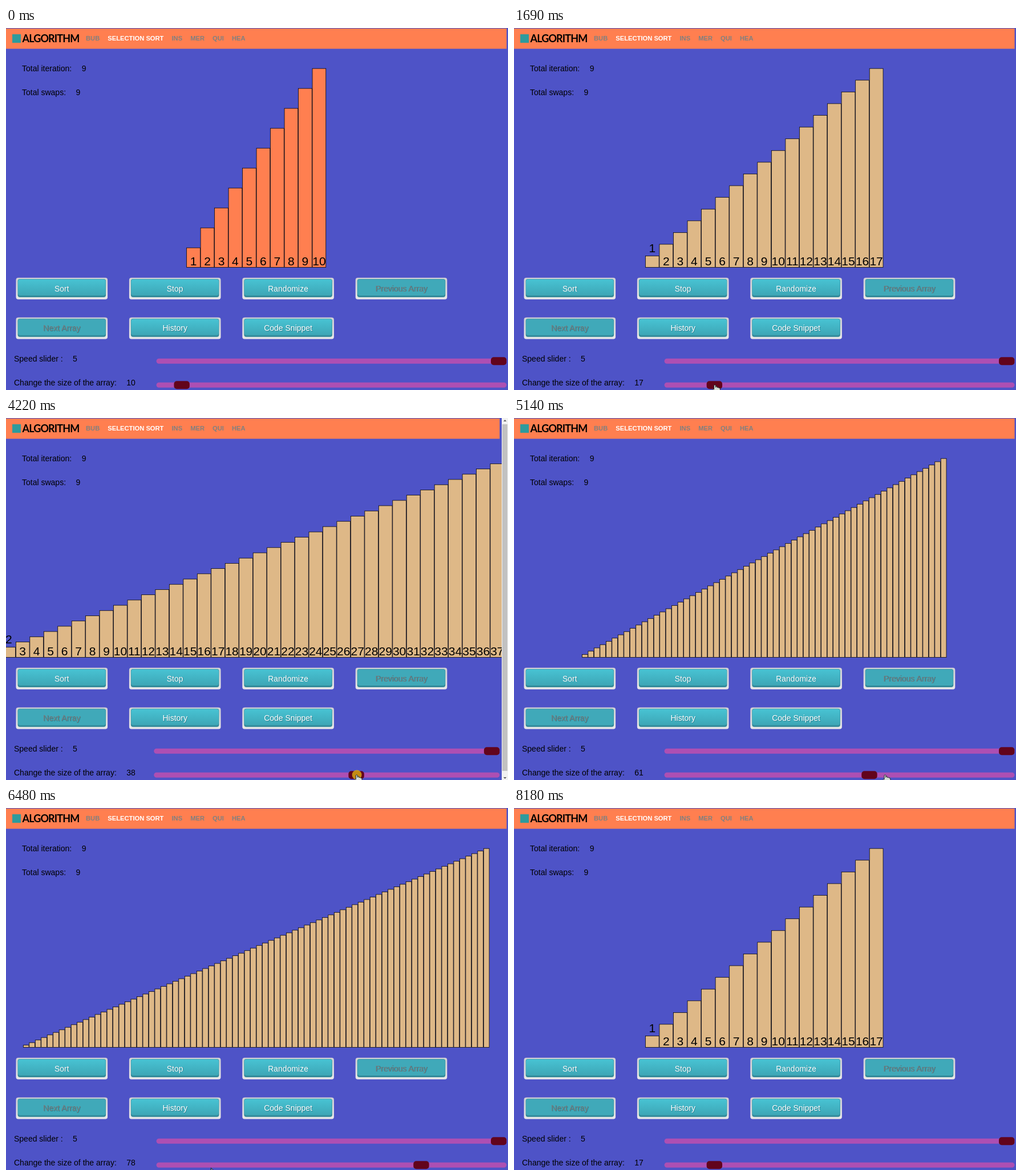
Write an HTML page that moves like this. It is 880x636 px and loops after 8.58 s.

```html
<!DOCTYPE html>
<html lang="en">
<head>
<meta charset="utf-8">
<title>Selection sort</title>
<style>
  html, body { margin: 0; width: 100%; height: 100%; overflow: hidden; background: #4e53c7; }
  svg { display: block; width: 880px; height: 636px; }
  text { font: 14px "Liberation Sans", Arial, sans-serif; white-space: pre; }
  .nav { font-size: 11.2px; font-weight: 700; fill: #808080; }
  .nav .active { fill: #fff; }
  .logo { font: 700 18px Lato, sans-serif; letter-spacing: -.85px; }
  .mid { text-anchor: middle; }
  .num { font-size: 21px; text-anchor: middle; }
</style>
</head>
<body>
<svg id="stage" viewBox="0 0 880 636">
  <defs>
    <linearGradient id="face" x2="0" y2="1">
      <stop stop-color="#48c3d3"/><stop offset="1" stop-color="#3da6b6"/>
    </linearGradient>
    <linearGradient id="rim" x2="0" y2="1">
      <stop stop-color="#cfd0d4"/><stop offset="1" stop-color="#e8e8e8"/>
    </linearGradient>
  </defs>
</svg>
<script>
const LOOP = 8580, FLOOR = 420.8, TALL = 350, LINE = .75, KNOB = 27.4, HOLD = 200;
const stage = document.getElementById('stage');

function set(el, attrs) {
  for (const k in attrs) el.setAttribute(k, attrs[k]);
}
function add(tag, attrs, parent = stage, text) {
  const el = document.createElementNS('http://www.w3.org/2000/svg', tag);
  set(el, attrs);
  if (text !== undefined) el.textContent = text;
  return parent.appendChild(el);
}
const box = (x, y, width, height, fill, rx = 0, parent) =>
  add('rect', { x, y, width, height, fill, rx }, parent);
const label = (x, y, text, attrs = {}, parent) =>
  add('text', { x, y, ...attrs }, parent, text);

// Header
const header = box(0, 1, 877.5, 35.5, '#ff7f50');
box(11, 11, 15, 15, '#2f9a9c');
label(28.5, 25, 'ALGORITHM', { class: 'logo' });
const nav = label(126, 22.3, '', { class: 'nav' });
for (const name of ['BUB', 'SELECTION SORT', 'INS', 'MER', 'QUI', 'HEA'])
  add('tspan', { dx: 14, class: name.includes(' ') ? 'active' : '' }, nav, name);

// Captions, each followed by its value
function caption(x, y, name, value) {
  const line = label(x, y, name);
  return add('tspan', { dx: 17.5 }, line, value);
}
caption(28, 76, 'Total iteration:', 9);
caption(28, 118, 'Total swaps:', 9);
caption(14, 586, 'Speed slider :', 5);
const sizeText = caption(14, 628, 'Change the size of the array:', '');

// Buttons
function button(col, row, name, off) {
  const x = 17.5 + col * 198.4, y = 438.7 + row * 69.8, cx = x + 80.3;
  box(x, y, 160.6, 38, 'url(#rim)', 4);
  box(x + 3, y + 2.3, 154.6, 32, '#338a9a', 4);
  box(x + 3.5, y + 2.8, 153.6, 28.5, off ? '#40a9b9' : 'url(#face)', 4);
  label(cx + .9, y + 24.7, name, { class: 'mid', fill: '#2d8190' });
  label(cx, y + 23.9, name, { class: 'mid', fill: off ? '#77797b' : '#fff' });
}
['Sort', 'Stop', 'Randomize', 'Previous Array', 'Next Array', 'History', 'Code Snippet']
  .forEach((name, i) => button(i % 4, i >> 2, name, name.endsWith('Array')));

// Sliders
function slider(y) {
  return {
    rail: box(0, y - 4.5, 0, 9, '#ad4fb3', 4.5),
    knob: box(0, y - 7, KNOB, 14, '#62041c', 5)
  };
}
const speed = slider(585.3), size = slider(627.2);
const isWide = n => n === 38;
const railOf = wide => wide ? { x: 259.3, width: 606 } : { x: 263.6, width: 613.8 };

function knobX(value, wide) {
  const { x, width } = railOf(wide);
  return x + (value - 5) / 95 * (width - KNOB);
}
function place(s, value, wide) {
  set(s.rail, railOf(wide));
  set(s.knob, { x: knobX(value, wide) });
}

const bars = add('g', {});

// Page scrollbar, shown while the bars overflow
const scroll = add('g', {});
box(869, 0, 11, 636, '#f1f1f1', 0, scroll);
box(870, 11, 9, 609, '#c1c1c1', 0, scroll);
add('path', { d: 'M872 6l2.7-3 2.7 3zM872 631l2.7 3 2.7-3z', fill: '#606060' }, scroll);

// Pointer
const halo = add('circle', { r: 8.5, fill: '#dcae12', opacity: .8 });
const pen = { fill: '#d5ddd6', stroke: '#23282c' };
const hand = add('path', {
  d: 'M-1.8 8V.8Q-.4-1 1 .8V4.4Q3 0 3.8 4.8Q5.6 3.6 6.4 5.4Q8.8 4.6 9 7V11L7.5 14H0L-4 8.6Q-3.4 6.6-1.8 8Z', ...pen
});
const arrow = add('path', { d: 'M0 0V12L3 9.4 5 14 7 13 5 8.8H9Z', ...pen, fill: '#8b8fa8' });

// Each drag: the pointer travels, holds the knob for HOLD, then the bars follow
const ENTER = 290, LEAVE = 7560, GONE = 8180;
const drags = [
  { from: ENTER, to: 1070, drop: 1460, value: 17, bow: -20 },
  { from: 2060, to: 2500, drop: 2780, value: 25 },
  { from: 3150, to: 3350, drop: 3550, value: 38 },
  { from: 3700, to: 4100, drop: 4360, value: 61 },
  { from: 5050, to: 5280, drop: 5450, value: 67 },
  { from: 5860, to: 5970, drop: 6170, value: 78 },
  { from: 6260, to: 6560, drop: 7260, value: 17, bow: 7 }
];
let before = 10, spot = 630;
for (const d of drags) {
  d.x0 = spot;
  d.x1 = spot = knobX(d.value, isWide(before)) + KNOB / 2 + 1;
  before = d.value;
}

const clamp = k => Math.max(0, Math.min(1, k));
const easeOut = k => 1 - (1 - k) ** 3;
const lerp = (a, b, k) => a + (b - a) * k;

function pointer(t) {
  if (t > LEAVE) {
    const k = (t - LEAVE) / (GONE - LEAVE);
    return [lerp(spot, 805, k), lerp(627, 634, k)];
  }
  const d = drags.findLast(d => t >= d.from);
  const k = clamp((t - d.from) / (d.to - d.from));
  return [lerp(d.x0, d.x1, easeOut(k)), 627 + (d.bow || 0) * Math.sin(Math.PI * k)];
}

function drawBars(n, fill) {
  bars.replaceChildren();
  const wide = isWide(n), numbered = n < 50;
  const pitch = !numbered ? 10.48 : wide ? 24.46 : 24.4 + n * .009;
  const left = (wide ? 432.8 : 438.7) - n * pitch / 2;
  for (let i = 0; i < n; i++) {
    const x = left + i * pitch, high = TALL * (i + 1) / n, top = FLOOR - high;
    add('rect', {
      x: x + LINE / 2, y: top + LINE / 2, width: pitch - LINE, height: high - LINE,
      fill, stroke: '#000', 'stroke-width': LINE
    }, bars);
    if (numbered) label(x + pitch / 2, high < 24 ? top - 6 : 416.5, i + 1, { class: 'num' }, bars);
  }
}

let shown;
function render(t) {
  const dropped = drags.findLast(d => t >= d.drop);
  const held = drags.find(d => t >= d.drop - HOLD && t < d.drop);
  const n = dropped ? dropped.value : 10, wide = isWide(n);
  if (shown !== dropped || shown === undefined) {
    shown = dropped;
    drawBars(n, dropped ? '#deb887' : '#ff7f50');
    sizeText.textContent = n;
    set(header, { width: wide ? 865.3 : 877.5 });
    set(scroll, { visibility: wide ? 'visible' : 'hidden' });
    place(speed, 100, wide);
  }
  place(size, held ? held.value : n, wide);

  const on = t >= ENTER && t < GONE;
  const [x, y] = on ? pointer(t) : [0, 0];
  const over = Math.abs(y - 627) < 4.5;
  const show = (el, yes) =>
    set(el, { transform: `translate(${x} ${y})`, visibility: yes ? 'visible' : 'hidden' });
  show(halo, on && held);
  show(hand, on && over);
  show(arrow, on && !over);
}

function frame(now) {
  render(now % LOOP);
  requestAnimationFrame(frame);
}
render(0);
requestAnimationFrame(frame);
</script>
</body>
</html>
```
